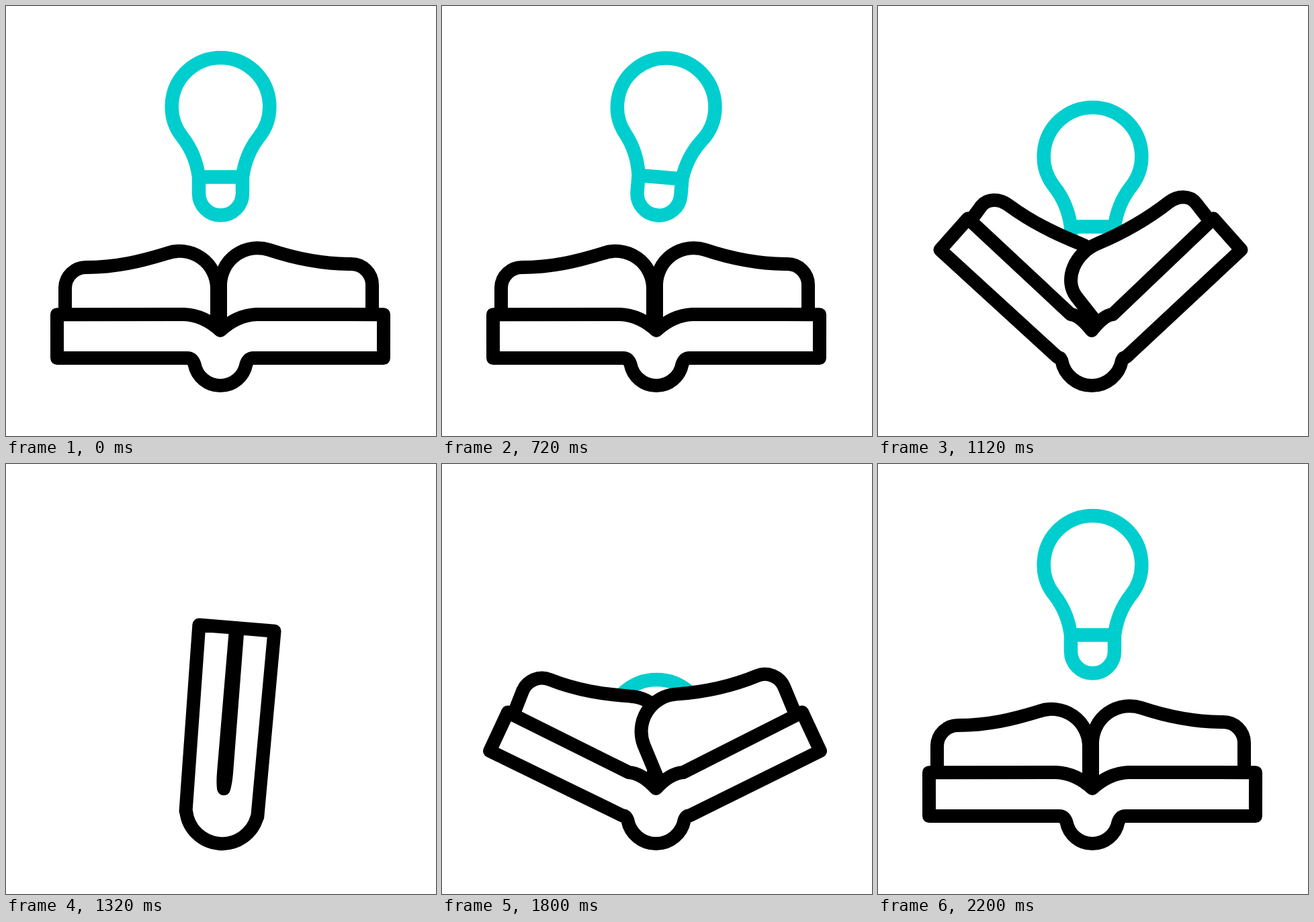
Recreate the animation shown at these times as an HTML page. Size 640x640 px, loop 2400 ms.

```html
<!DOCTYPE html>
<html lang="en">
<head>
<meta charset="utf-8">
<title>Book and bulb</title>
<style>
  html, body { margin: 0; width: 100%; height: 100%; overflow: hidden; background: #fff; }
  svg { display: block; width: 100vw; height: 100vh; }
  .ink { fill: #fff; stroke: #000; stroke-width: 20; }
  .ink path { vector-effect: non-scaling-stroke; }
  .bulb { fill: none; stroke: #00cece; stroke-width: 20.5; }
  .ray { stroke: #33cece; stroke-width: 20.5; }
  .shade { stroke: #000; }
</style>
</head>
<body>
<svg viewBox="0 0 640 640" stroke-linecap="round" stroke-linejoin="round">
  <defs>
    <clipPath id="between"><path id="wedge"/></clipPath>
    <g id="rays">
      <line class="ray" data-ray="157 75 190 93"/>
      <line class="ray" data-ray="145 149 193 149"/>
      <line class="ray shade" data-ray="157 222 190 206"/>
      <line class="ray" data-ray="190 206 157 222"/>
    </g>
  </defs>
  <use href="#rays"/>
  <use href="#rays" transform="translate(639) scale(-1 1)"/>
  <g clip-path="url(#between)">
    <path id="bulb" class="bulb" d="M287 254.5C284 232 275 211 262.5 195A72.8 72.8 0 1 1 376.5 195C364 211 355 232 352 254.5V279A32.5 32.5 0 0 1 287 279ZM287 254.5H352"/>
  </g>
  <g id="book" class="ink">
    <path id="leftPage" d="M-231 -14V-64A31 31 0 0 1 -200 -94C-155 -94 -118 -103 -79 -115A55.5 55.5 0 0 1 -5 -63V-4"/>
    <path id="rightPage" d="M226 -14V-68A31 31 0 0 0 195 -99C150 -99 112 -107 73 -120A55.5 55.5 0 0 0 0 -68V-4"/>
    <path id="cover"/>
  </g>
</svg>
<script>
const LOOP = 2400;
const HINGE = { x: 319, y: 483 };
const PAGE_LIFT = 20; // pages turn slightly above the cover hinge
const $ = id => document.getElementById(id);
const clamp = v => Math.max(0, Math.min(1, v));
const span = (t, from, to) => clamp((t - from) / (to - from));
const smooth = v => v * v * (3 - 2 * v);
const mix = (a, b, p) => a + (b - a) * p;
const inside = (t, from, to) => t > from && t < to;
const wave = (t, period) => Math.sin(2 * Math.PI * t / period);
const rays = [...document.querySelectorAll('[data-ray]')].map(el => ({
  el, ends: el.dataset.ray.split(' ').map(Number)
}));

function polar(radius, degrees) {
  const a = degrees * Math.PI / 180;
  return [radius * Math.cos(a), HINGE.y - radius * Math.sin(a)];
}

// p runs from 0 (flat open) to 1 (shut)
function coverPath(p) {
  const shift = -2.5 * clamp(p * 3);
  const bulge = Math.sin(Math.PI * p);
  const inner = polar(mix(244.2, 240, p) + 5 * bulge, mix(5.6, 89.7, p));
  const outer = polar(246.4 + 8 * bulge, mix(-9.6, 76.8, p));
  const knee = [mix(54, 2, p), 459];
  const hub = [mix(49, 53.5, p), mix(524, 521, p)];
  const neck = [mix(38.5, 53, p), mix(533, 521, p)];
  const sag = 565 - neck[1];
  const r = (neck[0] ** 2 + sag ** 2) / (2 * sag);
  const at = (side, [x, y], dx = -2 * p) => `${HINGE.x + dx + side * x} ${y}`;
  const valley = at(1, [0, HINGE.y]);
  const soft = [mix(34, 2, p), 460];
  const low = [mix(16, 2, p), mix(468, 474, p)];
  const lip = [mix(42, 53, p), mix(524, 521, p)];
  return `M${at(-1, outer, shift)}L${at(-1, inner, shift)}L${at(-1, knee)}` +
    `C${at(-1, soft)} ${at(-1, low)} ${valley}` +
    `C${at(1, low)} ${at(1, soft)} ${at(1, knee)}` +
    `L${at(1, inner, shift)}L${at(1, outer, shift)}L${at(1, hub)}` +
    `Q${at(1, lip)} ${at(1, neck)}A${r} ${r} 0 0 1 ${at(-1, neck)}` +
    `Q${at(-1, lip)} ${at(-1, hub)}Z`;
}

function drawBook(t, p) {
  const tilt = inside(t, 1240, 1640) ? 5 * wave(t - 1240, 400) : 0;
  const flat = Math.max(.01, 1 - smooth(span(p, .3, .8)));
  $('book').setAttribute('transform', `rotate(${tilt} 318 568)`);
  $('cover').setAttribute('d', coverPath(p));
  for (const [id, turn] of [['leftPage', 83], ['rightPage', -87]]) {
    const page = $(id);
    page.setAttribute('transform',
      `translate(${HINGE.x} ${HINGE.y - PAGE_LIFT}) rotate(${turn * p}) ` +
      `scale(1 ${flat}) translate(0 ${PAGE_LIFT})`);
    page.style.display = p > .85 ? 'none' : '';
  }
}

function drawBulb(t, p) {
  const sway = t < 800 ? -5 * wave(t, 400) : 0;
  const fall = 74 * (Math.max(0, t - 856) / 264) ** 2;
  const drop = t < 1440 ? Math.min(256, fall) : 256 * (1 - smooth(span(t, 1740, 2200)));
  const bulb = $('bulb');
  bulb.setAttribute('transform', `translate(0 ${drop}) rotate(${sway} 319.5 321)`);
  bulb.style.display = p > .93 ? 'none' : '';
  const [x, y] = polar(900, mix(0, 90, p));
  $('wedge').setAttribute('d',
    `M${HINGE.x} ${HINGE.y}L${HINGE.x - x} ${y}V-900H${HINGE.x + x}V${y}Z`);
}

function drawRays(t) {
  const start = 1 - span(t, 720, 860);
  const end = 1 - span(t, 900, 1050);
  for (const { el, ends: [x1, y1, x2, y2] } of rays) {
    el.style.display = inside(t, 720, 1050) ? '' : 'none';
    el.setAttribute('x1', mix(x1, x2, start));
    el.setAttribute('y1', mix(y1, y2, start));
    el.setAttribute('x2', mix(x1, x2, end));
    el.setAttribute('y2', mix(y1, y2, end));
  }
}

function draw(t) {
  const p = smooth(span(t, 1010, 1250)) - smooth(span(t, 1640, 1880));
  drawRays(t);
  drawBulb(t, p);
  drawBook(t, p);
}

const began = performance.now();
function tick() {
  const t = (performance.now() - began) % LOOP;
  draw(Math.floor(t / 40) * 40);
  requestAnimationFrame(tick);
}
draw(0);
requestAnimationFrame(tick);
</script>
</body>
</html>
```
